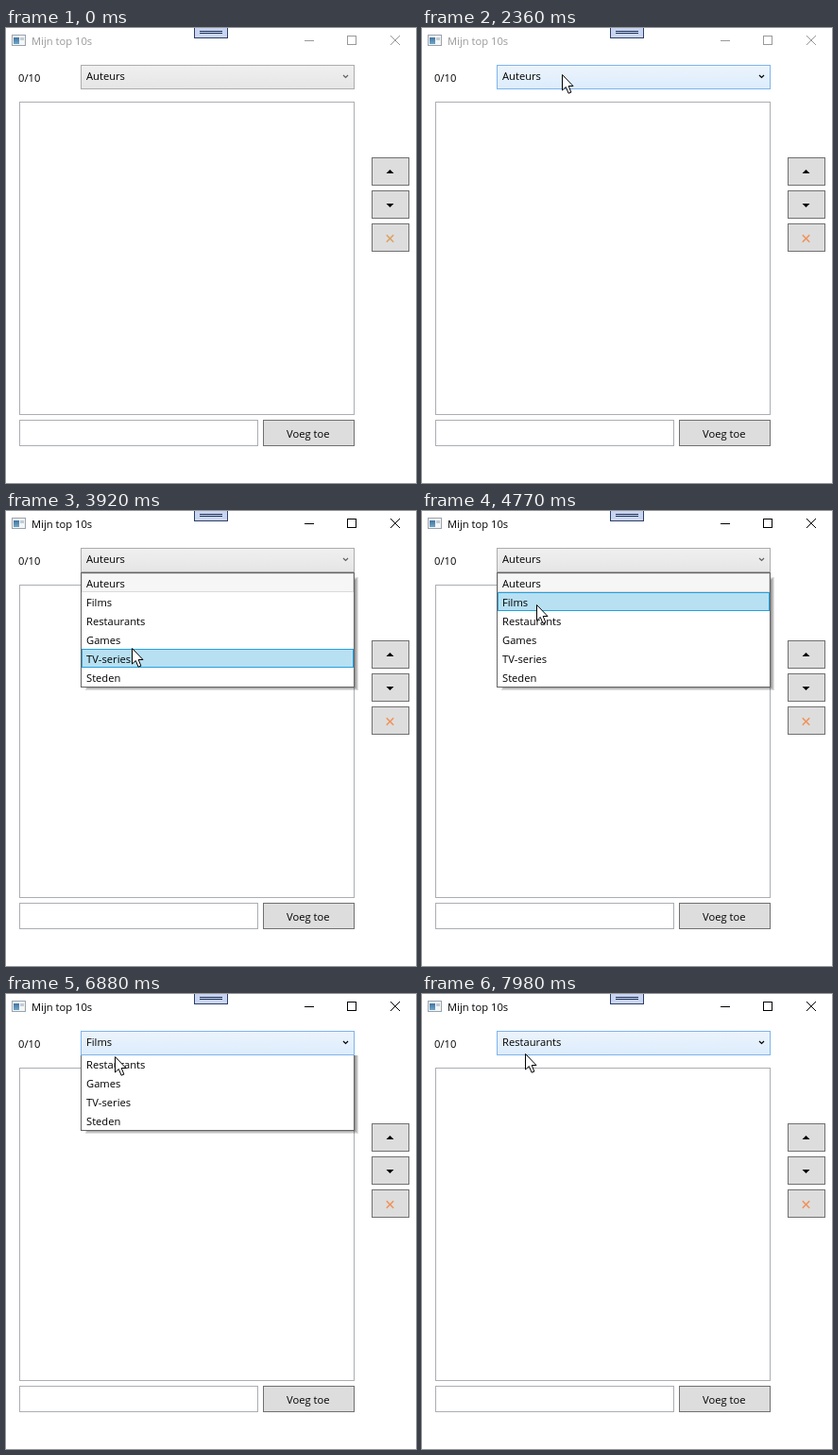
Write an HTML page with a canvas that moves like this. It is 434 by 482 pixels and loops after 8000 ms.

```html
<!DOCTYPE html>
<html lang="nl">
<head>
<meta charset="utf-8">
<title>Mijn top 10s</title>
<style>
  html, body { margin: 0; width: 434px; height: 482px; overflow: hidden; background: #fff; }
  canvas { display: block; }
</style>
</head>
<body>
<canvas id="stage" width="434" height="482"></canvas>
<script>
const ctx = document.getElementById('stage').getContext('2d');
const LOOP = 8000;
const SLIDE = 150;
const ROW = 20;
const ITEMS = ['Auteurs', 'Films', 'Restaurants', 'Games', 'TV-series', 'Steden'];
const FONT = '11.2px "Open Sans", "Noto Sans", sans-serif';

const ENTER = { start: 740, end: 1180 };
const RETURN = { start: 1360, x: 167, y: 0 };
const FIRST_CLICK = 2680, PICK_FILMS = 5860, SECOND_OPEN = 6783, PICK_RESTAURANTS = 7885;

// Pointer glides after its return; it rests between them
const GLIDES = [
  { start: 1360, end: 1505, x: 103, y: 20 },
  { start: 1510, end: 2050, x: 12, y: 57 },
  { start: 2130, end: 2350, x: 148, y: 49 },
  { start: 3290, end: 3760, x: 133, y: 174 },
  { start: 3760, end: 3910, x: 133, y: 145 },
  { start: 3960, end: 4070, x: 132, y: 135 },
  { start: 4330, end: 5080, x: 115, y: 78 },
  { start: 5320, end: 5550, x: 115, y: 87 },
  { start: 5860, end: 6500, x: 115, y: 66 },
  { start: 6960, end: 7510, x: 115, y: 101 },
  { start: 7600, end: 7800, x: 106, y: 110 },
  { start: 7810, end: 7970, x: 109, y: 63 }
];

const clamp = v => Math.max(0, Math.min(1, v));
const ease = k => k * k * (3 - 2 * k);
const during = (t, { start, end }) => clamp((t - start) / (end - start));

function pointerAt(t) {
  if (t < ENTER.start) return null;
  if (t < RETURN.start) {
    const k = during(t, ENTER);
    return k < 1 ? { x: Math.round(404 - 43 * k * k), y: Math.round(423 - 415 * k) } : null;
  }
  let { x, y } = RETURN;
  for (const glide of GLIDES) {
    const k = ease(during(t, glide));
    x += (glide.x - x) * k;
    y += (glide.y - y) * k;
  }
  return { x: Math.round(x), y: Math.round(y) };
}

const inside = (p, x, y, w, h) => p && p.x >= x && p.x < x + w && p.y >= y && p.y < y + h;

function box(x, y, w, h, fill, border) {
  ctx.fillStyle = border;
  ctx.fillRect(x, y, w, h);
  ctx.fillStyle = fill;
  ctx.fillRect(x + 1, y + 1, w - 2, h - 2);
}

function text(str, x, y, color = '#000') {
  ctx.font = FONT;
  ctx.fillStyle = color;
  ctx.fillText(str, x, y);
}

function line(color, width, ...points) {
  ctx.beginPath();
  points.forEach(([x, y]) => ctx.lineTo(x, y));
  ctx.strokeStyle = color;
  ctx.lineWidth = width;
  ctx.stroke();
}

function cross(x, y, r, color, width) {
  line(color, width, [x - r, y - r], [x + r, y + r]);
  line(color, width, [x + r, y - r], [x - r, y + r]);
}

function vertical(y, h, top, bottom) {
  const g = ctx.createLinearGradient(0, y, 0, y + h);
  g.addColorStop(0, top);
  g.addColorStop(1, bottom);
  return g;
}

function drawTitleBar(active) {
  const ink = active ? '#000' : '#999';
  box(6, 7, 15, 12, '#f4f6f8', '#9aa3ab');
  ctx.fillStyle = vertical(9, 8, '#3d6f9e', '#6fa5c4');
  ctx.fillRect(8, 10, 6, 7);
  ctx.fillStyle = '#c3ccd4';
  ctx.fillRect(15, 10, 4, 3);
  text('Mijn top 10s', 27, 18, ink);
  ctx.fillStyle = ink;
  ctx.fillRect(316, 13, 10, 1);
  box(361, 8, 10, 10, '#fff', ink);
  cross(412, 13, 5, ink, 1);

  box(199, -2, 36, 13, '#c9d5f0', '#2c3e66');
  ctx.fillStyle = '#1d2f58';
  ctx.fillRect(205, 3, 24, 1);
  ctx.fillRect(205, 5, 24, 1);
}

function drawCombo(label, hover) {
  const fill = hover ? vertical(39, 26, '#ecf4fc', '#dcecfc') : vertical(39, 26, '#f0f0f0', '#e5e5e5');
  box(79, 39, 290, 26, fill, hover ? '#7eb4ea' : '#acacac');
  text(label, 85, 55);
  line(hover ? '#000' : '#606060', 1.2, [357, 50], [359.5, 52.5], [362, 50]);
}

function sideButton(y, pointer) {
  const hover = inside(pointer, 387, y, 40, 30);
  box(387, y, 40, 30, hover ? '#bee6fd' : '#ddd', hover ? '#3c7fb1' : '#707070');
}

function arrow(y, direction) {
  ctx.beginPath();
  ctx.moveTo(402.5, y - 2 * direction);
  ctx.lineTo(410.5, y - 2 * direction);
  ctx.lineTo(406.5, y + 2 * direction);
  ctx.fillStyle = '#000';
  ctx.fill();
}

function drawSideButtons(pointer, refreshed) {
  for (let y = 137; y <= 207; y += 35) sideButton(y, pointer);
  arrow(152, -1);
  arrow(188, 1);
  cross(406.5, 223, 3.7, refreshed ? '#f0925a' : '#dba263', 1.6);
}

function drawPopup(progress, selected, hovered) {
  ctx.save();
  ctx.beginPath();
  ctx.rect(79, 65, 300, 130);
  ctx.clip();
  ctx.translate(0, -Math.round(122 * (1 - progress)));
  ctx.fillStyle = 'rgba(0,0,0,.12)';
  for (let k = 0; k < 4; k++) ctx.fillRect(84 + k, 70 + k, 289 - 2 * k, 120 - 2 * k);
  box(79, 65, 290, 122, '#fff', '#646464');
  ITEMS.forEach((name, i) => {
    const y = 66 + ROW * i;
    if (i === hovered) box(80, y, 288, ROW, '#b7e0f3', '#26a0da');
    else if (i === selected && hovered < 0) box(80, y, 288, ROW, '#cbe8f6', '#26a0da');
    else if (i === selected) box(80, y, 288, ROW, '#f6f6f6', '#dadada');
    text(name, 85, y + 15);
  });
  ctx.restore();
}

function drawPointer({ x, y }) {
  const shape = [[0, 0], [0, 16.5], [3.8, 13], [6.6, 19.7], [9.4, 18.6], [6.7, 12], [11.5, 12]];
  ctx.beginPath();
  shape.forEach(([dx, dy]) => ctx.lineTo(x + dx + .5, y + dy + .5));
  ctx.closePath();
  ctx.fillStyle = '#fff';
  ctx.fill();
  ctx.strokeStyle = '#000';
  ctx.lineWidth = 1;
  ctx.stroke();
}

function draw(t) {
  const pointer = pointerAt(t);
  const choice = t < PICK_FILMS ? 0 : t < PICK_RESTAURANTS ? 1 : 2;
  const opened = choice === 0 ? FIRST_CLICK + 60 : SECOND_OPEN;

  ctx.fillStyle = '#fff';
  ctx.fillRect(0, 0, 434, 482);
  drawTitleBar(t >= FIRST_CLICK);
  text('0/10', 13, 57);
  drawCombo(ITEMS[choice], inside(pointer, 79, 39, 290, 28));
  box(14, 78, 355, 332, '#fff', '#abadb3');
  box(14, 415, 253, 28, '#fff', '#abadb3');
  box(272, 415, 97, 28, '#ddd', '#707070');
  text('Voeg toe', 297, 434);
  drawSideButtons(pointer, t >= 960);
  if (choice < 2 && t >= opened) {
    // The pointer's hot spot lies just below its drawn tip
    const hovered = pointer.y >= 67 ? Math.floor((pointer.y - 64) / ROW) : -1;
    drawPopup(clamp((t - opened) / SLIDE), choice, hovered);
  }
  if (pointer) drawPointer(pointer);
}

function tick() {
  draw(performance.now() % LOOP);
  requestAnimationFrame(tick);
}
tick();
</script>
</body>
</html>
```
